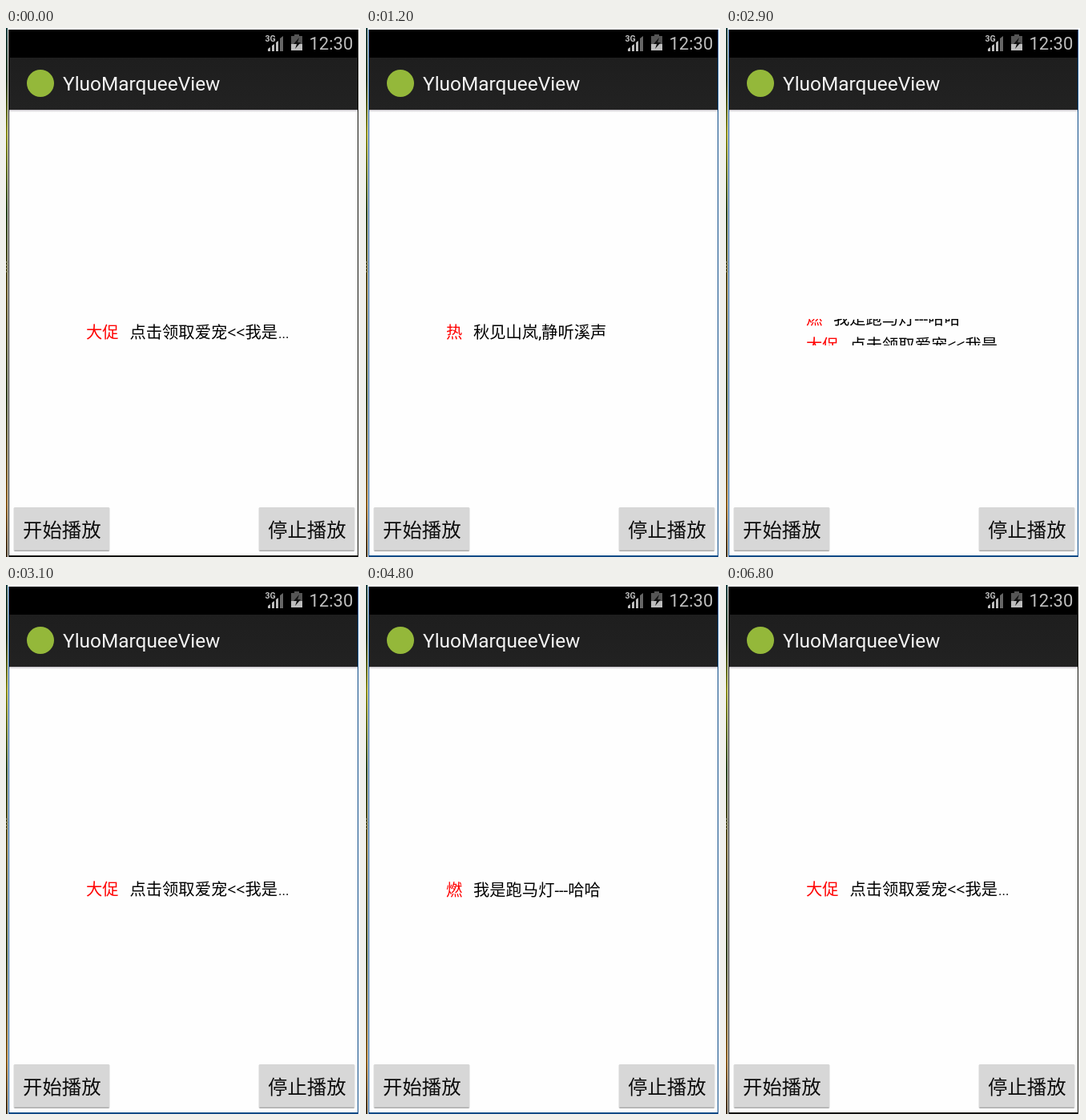
Write an HTML page that moves like this. It is 442 by 660 pixels and loops after 6.9 s.

```html
<!DOCTYPE html>
<html lang="zh-CN">
<head>
<meta charset="utf-8">
<title>YluoMarqueeView</title>
<style>
  html, body { margin: 0; width: 100%; height: 100%; overflow: hidden; background: #fff; }
  svg { display: block; width: 442px; height: 660px; }
  text { font-family: Roboto, "Noto Sans CJK SC", "Noto Sans CJK", sans-serif; white-space: pre; }
  .row { font-size: 20.3px; fill: #000; }
  .tag { fill: #f00; }
  .arrows { font-family: "Noto Sans", sans-serif; font-size: 19.5px; }
  .label { font-size: 24.4px; fill: #0c0c0c; }
</style>
</head>
<body>
<svg viewBox="0 0 442 660">
  <defs>
    <linearGradient id="desk" x2="0" y2="1">
      <stop offset="0" stop-color="#123c3c"/>
      <stop offset=".1" stop-color="#1c3014"/>
      <stop offset=".2" stop-color="#8a8c08"/>
      <stop offset=".35" stop-color="#26401a"/>
      <stop offset=".5" stop-color="#5a4a10"/>
      <stop offset=".7" stop-color="#2c3a12"/>
      <stop offset=".9" stop-color="#8a5a10"/>
      <stop offset="1" stop-color="#3a2a0c"/>
    </linearGradient>
    <linearGradient id="bar" x2="0" y2="1">
      <stop offset="0" stop-color="#1e1e1e"/>
      <stop offset="1" stop-color="#222"/>
    </linearGradient>
    <linearGradient id="shade" x2="0" y2="1">
      <stop offset="0" stop-color="#c4c0c6"/>
      <stop offset="1" stop-color="#fefefe"/>
    </linearGradient>
    <clipPath id="window"><rect x="98" y="363" width="256" height="33"/></clipPath>
    <g id="button">
      <rect width="120" height="55" rx="1.5" fill="#d7d7d7"/>
      <rect x="1" y="53.5" width="118" height="1.5" fill="#ababab"/>
    </g>
  </defs>

  <rect width="2" height="660" fill="url(#desk)"/>
  <path d="M0 292h3M0 296h3M0 300h3M0 304h3" stroke="#ddd" stroke-dasharray="1"/>
  <rect x="4" y="2" width="435" height="656" fill="#fefefe"/>
  <path id="edge" d="M3 2h1v656h435V2h1v658H3z"/>

  <!-- Status bar -->
  <rect x="4" y="2" width="435" height="35" fill="#000"/>
  <g fill="#bebebe">
    <text x="323.5" y="17" font-size="10.5" font-weight="700">3G</text>
    <path d="M327 29v-3l3-2v5zM332 29v-7l3-2v9zM337 29V18l3-2v13z"/>
    <path d="M342 29V13l4-3v19z" fill="#666"/>
    <path d="M360 8h6v2h4v18h-14V10h4z" fill="#555"/>
    <path d="M356 20h14v8h-14z"/>
    <path d="M366 12l-7 8h4l-2 6 7-8h-4z" fill="#111"/>
    <text x="378.5" y="27" font-size="22">12:30</text>
  </g>

  <!-- Action bar -->
  <rect x="4" y="37" width="435" height="65" fill="url(#bar)"/>
  <rect x="4" y="102" width="435" height="3" fill="url(#shade)"/>
  <circle cx="43" cy="69" r="17" fill="#94b83a"/>
  <text x="71" y="78" font-size="24.4" fill="#f3f3f3">YluoMarqueeView</text>

  <g clip-path="url(#window)">
    <g class="row">
      <text class="tag" x="100" y="387">大促</text>
      <text x="154.5" y="387">点击领取爱宠<tspan class="arrows">&lt;&lt;</tspan>我是</text>
      <text x="340" y="387" font-size="17">...</text>
    </g>
    <g class="row">
      <text class="tag" x="100" y="387">热</text>
      <text x="134" y="387">秋见山岚,静听溪声</text>
    </g>
    <g class="row">
      <text class="tag" x="100" y="387">燃</text>
      <text x="134" y="387">我是跑马灯---哈哈</text>
    </g>
  </g>

  <use href="#button" x="9.5" y="598"/>
  <text class="label" x="21" y="635">开始播放</text>
  <use href="#button" x="315.5" y="598"/>
  <text class="label" x="327" y="635">停止播放</text>
</svg>
<script>
  const LOOP = 6900, STEP = 100, ROW_HEIGHT = 33;
  const rows = [...document.querySelectorAll('.row')];
  const edge = document.getElementById('edge');

  // Each scroll: start time, then its progress at successive steps before settling.
  const scrolls = [
    { start: 900, progress: [.25, .57, .9] },
    { start: 2000, progress: [.57, .9] },
    { start: 2900, progress: [.52, .87] },
    { start: 3800, progress: [.84, .98] },
    { start: 4700, progress: [.84, .98] },
    { start: 5700, progress: [.57, .9] }
  ];

  function placeRow(row, offset) {
    row.setAttribute('visibility', 'visible');
    row.setAttribute('transform', `translate(0 ${offset})`);
  }

  function draw(now) {
    const time = now % LOOP;
    const count = scrolls.filter(s => s.start <= time).length;
    const scroll = scrolls[count - 1];
    const p = scroll ? scroll.progress[Math.floor((time - scroll.start) / STEP)] ?? 1 : 1;

    rows.forEach(row => row.setAttribute('visibility', 'hidden'));
    if (p < 1) placeRow(rows[(count - 1) % 3], Math.round(-p * ROW_HEIGHT));
    placeRow(rows[count % 3], Math.round((1 - p) * ROW_HEIGHT));

    const focused = time >= 900 && time < 6800;
    edge.setAttribute('fill', focused ? '#0b4a86' : '#10100a');
    requestAnimationFrame(draw);
  }
  requestAnimationFrame(draw);
</script>
</body>
</html>
```
